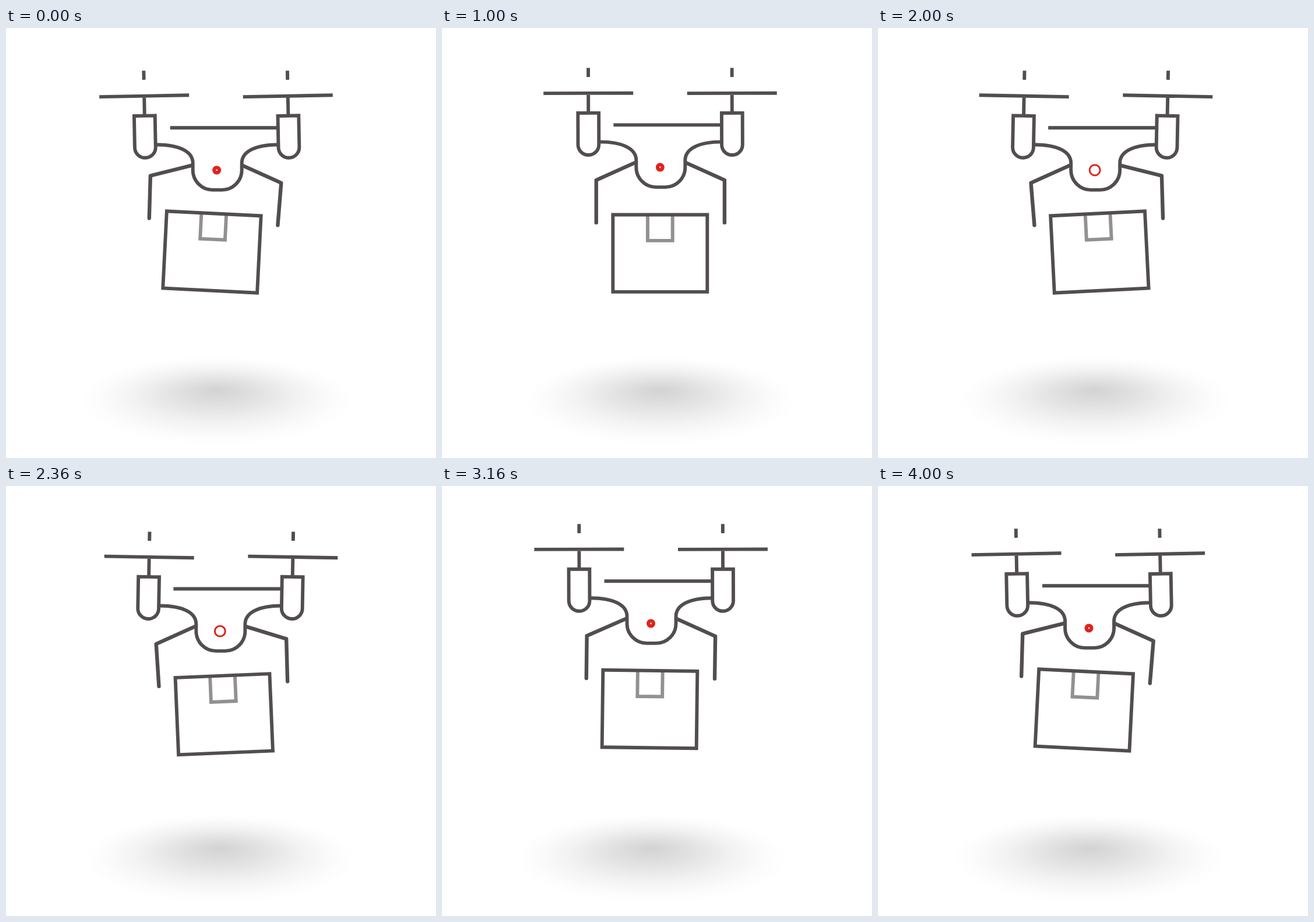
An HTML page for the animation above (4040 ms loop, 738 by 738 pixels).

```html
<!DOCTYPE html>
<html lang="en">
<head>
<meta charset="utf-8">
<title>Delivery drone</title>
<style>
  html, body { margin: 0; width: 100%; height: 100%; overflow: hidden; background: #fff; }
  svg { display: block; width: 100%; height: 100%; }
  .line { fill: none; stroke: #524d4e; stroke-width: 5.9; }
  .arm { stroke-width: 6.4; stroke-linecap: round; }
  .tape { stroke: #929091; }
  #lamp { fill: none; stroke: #e2231d; }
</style>
</head>
<body>
<svg viewBox="0 0 738 738">
  <defs>
    <radialGradient id="shade" gradientUnits="userSpaceOnUse" cx="0" cy="0" r="1" fx="0" fy="-.24"
      gradientTransform="scale(236 77)">
      <stop offset="0" stop-opacity=".175"/>
      <stop offset=".3" stop-opacity=".115"/>
      <stop offset=".6" stop-opacity=".05"/>
      <stop offset=".85" stop-opacity=".012"/>
      <stop offset="1" stop-opacity="0"/>
    </radialGradient>
    <!-- Rotor, with its pivot at the origin -->
    <g id="rotor" class="line">
      <path d="M0-122.7V-107M-77-79.2H77M0-79V-45"/>
      <path d="M-17.9-45.2H17.9V9A17.9 17.9 0 0 1-17.9 9Z"/>
    </g>
  </defs>

  <ellipse id="shadow" rx="236" ry="77" fill="url(#shade)"/>

  <g id="box" class="line">
    <path class="tape" d="M-21.4-64V-21.8H21.4V-64"/>
    <rect x="-81" y="-66.2" width="162" height="132.4"/>
  </g>

  <g id="drone">
    <path class="line" d="M-80-72.7H104"/>
    <path class="line" d="M-104-43.7C-64-43.7-41-32-41-12V0A34 34 0 0 0-7 34H9A34 34 0 0 0 43 0V-12C43-32 66-43.7 106-43.7"/>
    <path id="armL" class="line arm"/>
    <path id="armR" class="line arm"/>
    <use id="rotorL" href="#rotor"/>
    <use id="rotorR" href="#rotor"/>
    <circle id="lamp"/>
  </g>
</svg>

<script>
const LOOP = 4040, STEP = 40, SWING = 4000;
const TAU = Math.PI * 2, RAD = Math.PI / 180;
const el = id => document.getElementById(id);
const place = (id, x, y, angle = 0) =>
  el(id).setAttribute('transform', `translate(${x} ${y}) rotate(${angle})`);
const wave = (t, peak, period) => Math.cos(TAU * (t - peak) / period);
const smooth = (t, a, b) => {
  const p = Math.min(1, Math.max(0, (t - a) / (b - a)));
  return p * p * (3 - 2 * p);
};

// side: -1 left, 1 right; lean: 1 when the box swings fully towards that side
function arm(id, side, lean) {
  const lift = (24.2 - 10.2 * Math.max(0, lean) ** 2) * RAD;
  const out = (3.1 * lean - 1.5 * lean * lean) * RAD;
  const at = (x, y) => `${0.5 + side * x} ${y}`;
  const x = 43.5 + 73 * Math.cos(lift), y = -8 + 73 * Math.sin(lift);
  el(id).setAttribute('d', `M${at(43.5, -8)}L${at(x, y)}M${at(x, y + 1)}L` +
    at(x + 73 * Math.sin(out), y + 73 * Math.cos(out)));
}

function draw(t) {
  const x = 367 + 9 * wave(t, 1392, 3970);
  const y = 241.5 + 7.7 * wave(t, 400, SWING / 2);
  const swing = wave(t, 0, SWING);
  const tilt = -1.1 * wave(t, 80, SWING);

  place('shadow', x, 640);
  place('drone', x, y);
  place('rotorL', -123, -48, tilt);
  place('rotorR', 123.6, -48, tilt);
  arm('armL', -1, swing);
  arm('armR', 1, -swing);
  place('box', x - 8.2 * swing, y + 147.6 - 7 * swing * swing, 2.85 * swing);

  const open = smooth(t, 1000, 2000) - smooth(t, 2300, 3160);
  el('lamp').setAttribute('r', 4.4 + 4.6 * open);
  el('lamp').setAttribute('stroke-width', 6.2 - 3.2 * open);
}

function tick() {
  const t = performance.now() % LOOP;
  draw(Math.floor(t / STEP) * STEP);
  requestAnimationFrame(tick);
}
tick();
</script>
</body>
</html>
```
